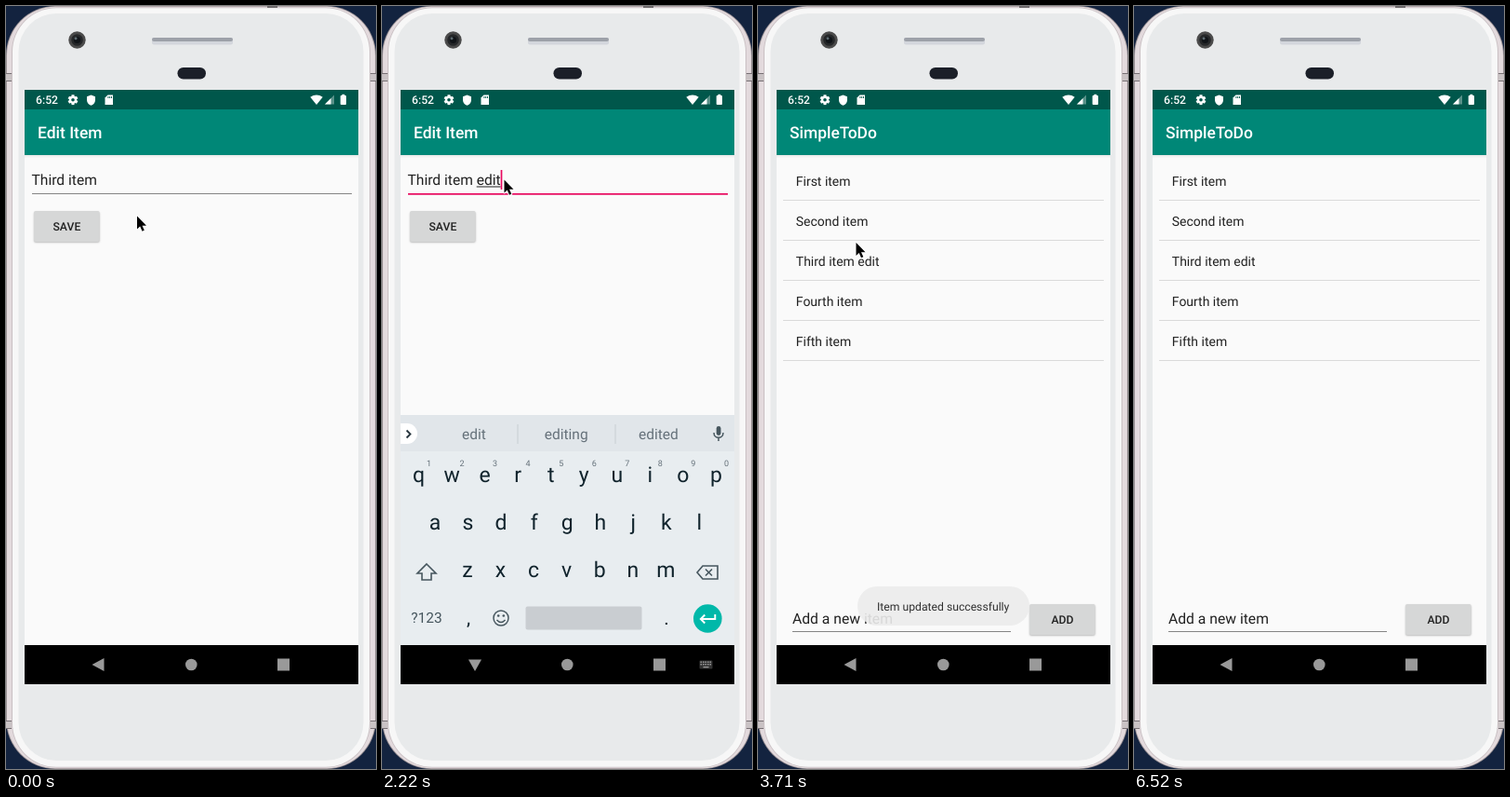
An HTML page with a canvas that plays this animation: 398x819 px, repeating every 7.26 s.

```html
<!DOCTYPE html>
<html lang="en">
<head>
<meta charset="utf-8">
<title>Edit item</title>
<style>
html, body { margin: 0; width: 100%; height: 100%; overflow: hidden; background: #13233f; }
canvas { display: block; width: 398px; height: 819px; }
</style>
</head>
<body>
<canvas id="stage"></canvas>
<script>
const LOOP = 7260, W = 398, H = 819, DPR = window.devicePixelRatio || 1;
const ACCENT = '#e8095f', INK = '#212121', NAV = '#999';

function context(canvas) {
  canvas.width = W * DPR;
  canvas.height = H * DPR;
  const ctx = canvas.getContext('2d');
  ctx.scale(DPR, DPR);
  ctx.textRendering = 'geometricPrecision';
  return ctx;
}
let c = context(document.getElementById('stage'));
const buffer = context(document.createElement('canvas'));

// Stepped tracks: [start time, ...values], held until the next entry
const POINTER = [
  [0, 141, 225.5], [150, 140, 217], [300, 135, 195], [440, 131.5, 179.5], [2220, 131.5, 186.5],
  [2370, 118, 207], [2520, 100, 224], [2670, 86, 230.5], [3420, 90, 236], [3560, 100, 247],
  [3710, 105.5, 254], [4160, 185, 360], [4310, 279, 503], [4610, 286, 520], [4760, 300, 562],
  [4910, 315, 610], [5060, 325, 642], [5200, 330, 652], [5350, 327, 653], [5930, 329, 668],
  [6080, 335, 708], [6220, 341, 755], [6370, 343, 791]
];
const TYPING = [
  [0, '', 'item', 'item', 'items', 'itemized'],
  [1180, 'item ', '', 'is', 'and', 'in'],
  [1330, 'item ', 'e', 'e', 'every', 'each'],
  [1480, 'item ', 'ed', 'ed', 'edited', 'edit'],
  [1630, 'item ', 'edi', 'edit', 'edition', 'editing'],
  [1780, 'item ', 'edit', 'edit', 'editing', 'edited']
];
const KEYBOARD = [[0, 0, 0], [740, 30, .5], [890, 4, .95], [1030, 0, 1], [3120, 46, .07], [3270, 0, 0]];
const TOAST = [[0, 0], [3120, .5], [3270, 1], [5060, .6], [5200, .2], [5350, 0]];

const at = (track, t) => track.filter(k => k[0] <= t).pop().slice(1);

function rect(x, y, w, h, color) {
  c.fillStyle = color;
  c.fillRect(x, y, w, h);
}
function round(x, y, w, h, r, color) {
  c.fillStyle = color;
  c.beginPath();
  c.roundRect(x, y, w, h, r);
  c.fill();
}
function disc(x, y, r, color) {
  c.fillStyle = color;
  c.beginPath();
  c.arc(x, y, r, 0, 7);
  c.fill();
}
function shape(d, x, y, fill, stroke, width = 1) {
  const p = new Path2D(d);
  c.save();
  c.translate(x, y);
  if (stroke) { c.strokeStyle = stroke; c.lineWidth = width; c.stroke(p); }
  if (fill) { c.fillStyle = fill; c.fill(p); }
  c.restore();
}
function text(s, x, y, size, color = INK, weight = 400, align = 'left') {
  c.font = `${weight} ${size}px Roboto, sans-serif`;
  c.textAlign = align;
  c.fillStyle = color;
  c.fillText(s, x, y);
  return c.measureText(s).width;
}
// Draws into the buffer first, so that overlapping parts fade as one
function layer(alpha, dy, draw) {
  const main = c;
  c = buffer;
  c.clearRect(0, 0, W, H);
  draw();
  c = main;
  c.globalAlpha = alpha;
  c.drawImage(buffer.canvas, 0, dy, W, H);
  c.globalAlpha = 1;
}
function clipTo(x, y, w, h) {
  c.beginPath();
  c.rect(x, y, w, h);
  c.clip();
}

function phone() {
  rect(0, 0, W, H, '#13233f');
  round(0, 0, W, H, 53, '#9d9497');
  round(1, .8, 396, 817.4, 52, '#e3dadd');
  for (const x of [0, 392]) for (const y of [72, 767]) {
    rect(x, y, 6, 9, '#c9c2c4');
    rect(x, y, 6, 1, '#777074');
    rect(x, y + 8, 6, 1, '#777074');
  }
  round(6, 1.5, 386, 816, 48, '#c9c0c3');
  round(7, 2.2, 384, 814.6, 47, '#f7f7f7');
  round(13.5, 8, 371, 802, 41, '#e8eaeb');
  rect(281, 0, 11, 2, '#6d686b');
  disc(76.5, 36.5, 9.2, '#4b4b4b');
  disc(76.5, 36.5, 6.3, '#252729');
  disc(76.5, 36.5, 3.6, '#101418');
  disc(75, 34.8, 1.5, '#5d6a70');
  round(157, 34, 87, 7.5, 2, '#d3d6dc');
  round(157, 34, 87, 4, 2, '#9da1a9');
  round(184.5, 66, 30.5, 12.5, 6.2, '#1b1f28');
}

function bars(title) {
  rect(20, 90, 359, 21, '#00574b');
  rect(20, 111, 359, 49, '#008777');
  for (let i = 0; i < 3; i++) rect(20, 160 + i, 359, 1, `rgba(0,0,0,${.06 - i * .02})`);
  text(title, 34, 142, 17.46, '#fff', 500);
}

function statusIcons() {
  text('6:52', 32, 105, 12.2, '#fff', 500);
  c.save();
  c.translate(72, 100.7);
  for (let i = 0; i < 6; i++) {
    c.rotate(Math.PI / 3);
    rect(-1.5, -5.4, 3, 3.5, '#fff');
  }
  disc(0, 0, 4.1, '#fff');
  disc(0, 0, 1.8, '#00574b');
  c.restore();
  shape('M0-5.5 4.5-3.8V0C4.5 3 2.3 5 0 5.7-2.3 5-4.5 3-4.5 0V-3.8Z', 91.5, 101, '#fff');
  shape('M3 0H8.5V10.5H0V3Z', 106.5, 95.5, '#fff');
  for (let i = 0; i < 3; i++) rect(109.5 + i * 1.8, 97, .9, 2, '#00574b');
  shape('M0 2.2Q6.7-2.4 13.4 2.2L6.7 10.5Z', 327.3, 95.5, '#fff');
  shape('M10 0V10H0Z', 343, 95.5, 'rgba(255,255,255,.35)');
  shape('M6.5 3.5V10H0Z', 343, 95.5, '#fff');
  round(359.7, 96, 6.3, 10, 1, '#fff');
  rect(361.4, 94.8, 2.9, 2, '#fff');
}

function button(label, x, y, color = '#d6d7d7') {
  c.save();
  c.shadowColor = 'rgba(0,0,0,.25)';
  c.shadowBlur = 2 * DPR;
  c.shadowOffsetY = DPR;
  round(x, y, 70.7, 33, 2, color);
  c.restore();
  text(label, x + 35.4, y + 21, 12.2, INK, 500, 'center');
}

function editScreen(t) {
  const [head, word] = at(TYPING, t), focused = t >= 440;
  rect(20, 90, 359, 596, '#fafafa');
  bars('Edit Item');
  const x = 27.5 + text('Third ' + head, 27.5, 192, 15.6);
  const end = x + text(word, x, 192, 15.6);
  if (!focused) rect(28, 201, 344, 1, '#858585');
  else {
    rect(28, 201, 344, 1.7, ACCENT);
    if (t >= 1030 && word) rect(x, 193.5, end - x, 1, INK);
    if (t < 2280 || t >= 2780) rect(end, 176, 1.7, 21, ACCENT);
    if (t < 1180) {
      disc(end + .8, 208.7, 8.6, ACCENT);
      shape('M0-12 6.1-6H-6.1Z', end + .8, 208.7, ACCENT);
    }
  }
  button('SAVE', 30, 220, t >= 2820 ? '#c4c5c5' : undefined);
}

function listScreen() {
  rect(20, 90, 359, 610, '#fafafa');
  bars('SimpleToDo');
  ['First item', 'Second item', 'Third item edit', 'Fourth item', 'Fifth item'].forEach((s, i) => {
    text(s, 40.8, 193 + i * 42.9, 13.97);
    rect(27, Math.round(208.4 + i * 42.9), 345, 1, '#dadada');
  });
  text('Add a new item', 37, 663, 15.7);
  rect(37, 671, 235, 1, '#858585');
  button('ADD', 292, 642);
}

function toast() {
  round(107, 623, 185, 42, 21, 'rgba(236,236,236,.9)');
  text('Item updated successfully', 128, 649, 12.2, '#303030');
}

function keyboard(words) {
  const key = '#10232c', soft = '#46565e';
  rect(20, 439, 359, 39, '#e1e6ea');
  rect(20, 478, 359, 208, '#e8edf0');
  round(20, 448, 18, 22, [0, 11, 11, 0], '#fff');
  shape('M-2-4 2 0-2 4', 28.5, 459.5, null, '#26353d', 1.8);
  words.forEach((w, i) => text(w, 99 + i * 99.2, 465, 15.5, '#65717a', 400, 'center'));
  rect(145.5, 449, 1, 21, '#c7cdd2');
  rect(250.5, 449, 1, 21, '#c7cdd2');
  round(359.7, 451, 4.8, 10, 2.4, soft);
  shape('M-5-1C-5 6 5 6 5-1M0 4V8', 362, 459, null, soft, 1.5);

  ['qwertyuiop', 'asdfghjkl', 'zxcvbnm'].forEach((row, r) => [...row].forEach((ch, i) => {
    const x = [39.5, 57, 92][r] + i * 35.55;
    text(ch, x, 511 + r * 51, 23, key, 400, 'center');
    if (!r) text((i + 1) % 10, x + 11, 494, 9, '#65717a', 400, 'center');
  }));
  shape('M0-9 10 1H5V8H-5V1H-10Z', 48, 608, null, soft, 1.6);
  shape('M-11 0-5-7H11V7H-5ZM-2-3.5 5 3.5M5-3.5-2 3.5', 350, 608, null, soft, 1.6);
  text('?123', 48, 662, 15.5, soft, 400, 'center');
  text(',', 93, 664, 21, key, 400, 'center');
  text('.', 306, 664, 21, key, 400, 'center');
  shape('M8 0A8 8 0 1 1-8 0A8 8 0 1 1 8 0M-4.5 2Q0 7 4.5 2', 128, 657, null, soft, 1.5);
  disc(125.2, 654.5, 1.3, soft);
  disc(130.8, 654.5, 1.3, soft);
  round(154.5, 644.5, 125, 25, 2, '#c9cdd1');
  disc(350.3, 657.5, 15.3, '#00b8a9');
  shape('M8-4V1H-7M-3-3.5-7.5 1-3 5.5', 350.3, 657, null, '#fff', 1.9);
}

function navIcons(typing) {
  if (typing) {
    shape('M-7-5.5H7L0 7Z', 100, 707, NAV);
    round(341.5, 702.5, 14, 9, 1, '#333');
    for (let i = 0; i < 10; i++) rect(342.5 + i % 5 * 2.5, 703.5 + (i > 4) * 2.5, 1.5, 1.5, NAV);
    rect(345.5, 709, 6, 1.3, NAV);
  } else {
    shape('M6-7V7L-7 0Z', 99.5, 707, NAV);
  }
  disc(199.3, 707, 6.3, NAV);
  rect(292, 700.5, 13, 13, NAV);
}

function pointer(x, y) {
  c.save();
  c.lineJoin = 'round';
  shape('M0 0V14L3.2 11 5.5 16.3 7.8 15.3 5.5 10.2H10Z', x, y, '#000', '#fff', 2);
  c.restore();
}

function draw(t) {
  const leaving = t >= 3120 && t < 3270;
  const [drop, alpha] = at(KEYBOARD, t);
  const [toastAlpha] = at(TOAST, t);
  phone();

  c.save();
  clipTo(20, 90, 359, 638);
  if (t < 3120) editScreen(t);
  else if (leaving) {
    layer(1, -7, listScreen);
    rect(20, 90, 359, 563, 'rgba(0,0,0,.084)');
    rect(20, 653, 359, 48, '#fafafa');
  } else listScreen();
  rect(20, leaving ? 701 : 686, 359, 42, '#000');
  statusIcons();
  if (toastAlpha) layer(toastAlpha, 0, toast);
  if (alpha) layer(alpha, drop, () => keyboard(at(TYPING, t).slice(2)));
  navIcons(t >= 740 && t < 3120);
  c.restore();

  if (t < 6520) pointer(...at(POINTER, t));
}

function tick() {
  draw(performance.now() % LOOP);
  requestAnimationFrame(tick);
}
tick();
</script>
</body>
</html>
```
